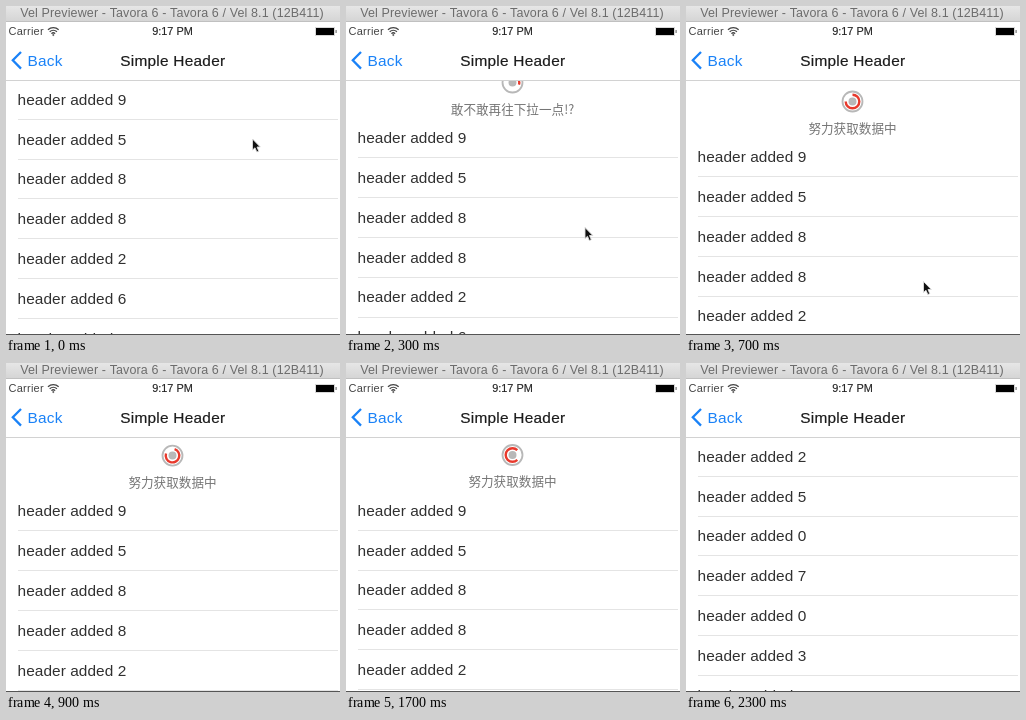
Animation of 334x329 px, one loop 2.4 s. Source, as an HTML page with a canvas:

```html
<!DOCTYPE html>
<html lang="zh-CN">
<head>
<meta charset="utf-8">
<title>Pull to refresh</title>
<style>
html, body { margin: 0; width: 100%; height: 100%; overflow: hidden; background: #fff; }
canvas { display: block; }
</style>
</head>
<body>
<canvas id="stage" width="334" height="329"></canvas>
<script>
const ctx = document.getElementById('stage').getContext('2d');
const SANS = '"Liberation Sans", Arial, sans-serif';
const CJK = '"Noto Sans CJK SC", "Noto Sans CJK", sans-serif';
const LOOP = 2400, STEP = 100, TOP = 74, ROW = 39.8, SWEEP = 270;
const OLD = [9, 5, 8, 8, 2, 6, 9], FRESH = [2, 5, 0, 7, 0, 3, 9];

// Value at time t from [time, value] keys, linear in between
function along(t, keys) {
  if (t <= keys[0][0]) return keys[0][1];
  for (let i = 1; i < keys.length; i++) {
    const [a, u] = keys[i - 1], [b, v] = keys[i];
    if (t <= b) return u + (v - u) * (t - a) / (b - a);
  }
  return keys[keys.length - 1][1];
}

const PULL = [[100, 0], [200, 19], [300, 38.5], [400, 52], [500, 61], [600, 61],
  [700, 57.5], [800, 55.5], [900, 54.6], [1000, 54], [1800, 54],
  [1900, 45], [2000, 26], [2100, 10], [2200, 2.5], [2300, 0]];
const MOUSE_X = [[100, 246.5], [300, 239], [500, 237.5]];
const MOUSE_Y = [[100, 133], [200, 177], [300, 221.5], [400, 254], [500, 275.5]];
const TURN = [[700, 0], [1200, 45], [2200, 225]];

function rect(x, y, w, h, color) {
  ctx.fillStyle = color;
  ctx.fillRect(x, y, w, h);
}

function text(str, x, y, size, color, { align = 'left', font = SANS, bold = 0, gap = 0 } = {}) {
  ctx.font = `${size}px ${font}`;
  ctx.textAlign = align;
  ctx.letterSpacing = gap + 'px';
  ctx.fillStyle = ctx.strokeStyle = color;
  ctx.fillText(str, x, y);
  if (bold) {
    ctx.lineWidth = bold;
    ctx.strokeText(str, x, y);
  }
}

function arc(x, y, r, from, to, color, width) {
  const rad = d => (d - 90) * Math.PI / 180;
  ctx.beginPath();
  ctx.arc(x, y, r, rad(from), rad(to));
  ctx.strokeStyle = color;
  ctx.lineWidth = width;
  ctx.stroke();
}

function path(points) {
  ctx.beginPath();
  points.forEach(([x, y]) => ctx.lineTo(x, y));
}

function spinner(y, start, sweep) {
  arc(166.5, y, 10, 0, 360, '#b8b8b8', 1.8);
  arc(166.5, y, 2, 0, 360, '#b8b8b8', 4);
  if (sweep > 0) arc(166.5, y, 6.8, start, start + sweep, '#e8392c', 2.4);
}

function header(t, pull) {
  const loading = t >= 700;
  const sweep = Math.max(0, Math.min(SWEEP, SWEEP * (pull - 28) / 26));
  spinner(TOP - 36 + pull, along(t, TURN), loading ? SWEEP : sweep);
  const label = loading ? '努力获取数据中' : pull > 54 ? '赶紧放开我吧' : '敢不敢再往下拉一点!?';
  text(label, 166.5, TOP - 4.7 + pull, 12.6, '#757575', { align: 'center', font: CJK });
}

function list(t, pull) {
  (t >= 1900 ? FRESH : OLD).forEach((n, i) => {
    const y = TOP + pull + ROW * i, line = Math.round(y + ROW) - 1;
    if (i === 1 && t === 100) rect(0, line - 40, 334, 41, '#dedede');
    else rect(12, line, 320, 1, '#e4e4e4');
    text('header added ' + n, 11.5, y + 24.7, 15.4, '#303030', { gap: 0.07 });
  });
}

function bars() {
  rect(0, 0, 334, TOP, '#fff');
  rect(0, TOP, 334, 1, '#d2d2d2');
  const shade = ctx.createLinearGradient(0, 0, 0, 16);
  shade.addColorStop(0, '#e6e6e6');
  shade.addColorStop(1, '#d4d4d4');
  rect(0, 0, 334, 15, shade);
  rect(0, 15, 334, 1, '#c0c0c0');
  text('Vel Previewer - Tavora 6 - Tavora 6 / Vel 8.1 (12B411)', 166, 10.5, 12.5, '#6c6c6c',
    { align: 'center', gap: 0.12 });

  text('Carrier', 2.5, 29.3, 11, '#444', { gap: 0.25 });
  for (const r of [2.8, 5.4, 8]) arc(47.3, 29.7, r, -42, 42, '#444', 1.3);
  arc(47.3, 29, 0.6, 0, 360, '#444', 1);
  text('9:17 PM', 166.5, 29.3, 10.9, '#222', { align: 'center', bold: 0.15 });
  rect(309, 21, 20, 9, '#d8d8d8');
  rect(310, 22, 18, 7, '#000');
  rect(329.5, 24, 1.2, 3, '#777');

  path([[15, 46], [6.8, 54.3], [15, 62.6]]);
  ctx.strokeStyle = '#1a82f7';
  ctx.lineWidth = 2.3;
  ctx.stroke();
  text('Back', 21.5, 59.7, 15.4, '#1a82f7', { gap: 0.25 });
  text('Simple Header', 166.8, 59.7, 15.4, '#1c1c1c', { align: 'center', bold: 0.2, gap: 0.25 });
}

function cursor(x, y) {
  path([[0, 0], [0, 11], [2.5, 8.8], [4.3, 13], [6.3, 12.2], [4.5, 8], [7.8, 8]]
    .map(([a, b]) => [x + a, y + b]));
  ctx.closePath();
  ctx.fillStyle = '#111';
  ctx.fill();
  ctx.strokeStyle = '#ddd';
  ctx.lineWidth = 0.9;
  ctx.stroke();
}

function draw(now) {
  const t = Math.floor(now % LOOP / STEP) * STEP;
  const pull = along(t, PULL);
  rect(0, 0, 334, 329, '#fff');
  if (t < 1900 && pull > 0) header(t, pull);
  list(t, pull);
  bars();
  rect(0, 328, 334, 1, '#555');
  if (t < 900) cursor(along(t, MOUSE_X), along(t, MOUSE_Y));
}

const start = performance.now();
(function tick() {
  draw(performance.now() - start);
  requestAnimationFrame(tick);
})();
</script>
</body>
</html>
```
